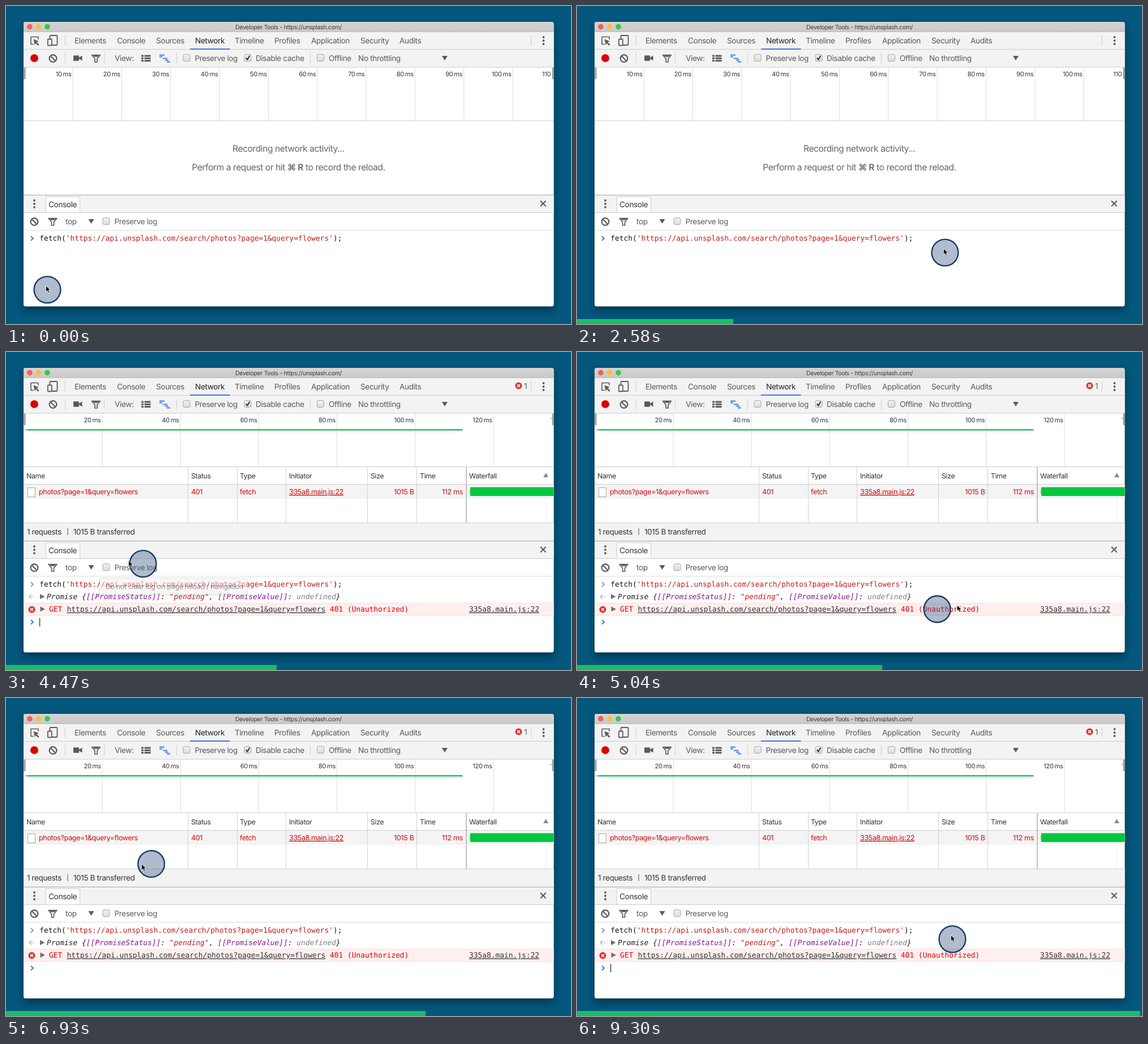
These frames come from a looping animation (998x561 px, 9330 ms). An HTML page:

```html
<!DOCTYPE html>
<html lang="en">
<head>
<meta charset="utf-8">
<title>Network panel demo</title>
<style>
html, body { margin: 0; width: 100%; height: 100%; overflow: hidden; background: #04577d; }
svg { display: block; width: 998px; height: 561px; }
text { font-family: Inter, Roboto, sans-serif; letter-spacing: -.03em; text-rendering: geometricPrecision; white-space: pre; }
.mono { font-family: "DejaVu Sans Mono", "Liberation Mono", monospace; font-size: 12.86px; letter-spacing: 0; }
</style>
</head>
<body>
<svg id="stage" viewBox="0 0 998 561" xmlns="http://www.w3.org/2000/svg"></svg>
<script>
const LOOP = 9330, STEP = 30, SENT = 3060;
const INK = '#5a5a5a', RED = '#d40b0b', LINE = '#cdcdcd', BAR = '#f3f3f3';
const URL_TEXT = 'https://api.unsplash.com/search/photos?page=1&amp;query=flowers';

// Drawing helpers
const rect = (x, y, w, h, fill, more = '') => `<rect x="${x}" y="${y}" width="${w}" height="${h}" fill="${fill}" ${more}/>`;
const dot = (x, y, r, fill, more = '') => `<circle cx="${x}" cy="${y}" r="${r}" fill="${fill}" ${more}/>`;
const path = (d, fill, more = '') => `<path d="${d}" fill="${fill}" ${more}/>`;
const stroke = (d, color, w = 1) => path(d, 'none', `stroke="${color}" stroke-width="${w}"`);
const text = (x, y, s, size = 13.7, fill = INK, more = '') => `<text x="${x}" y="${y}" font-size="${size}" fill="${fill}" ${more}>${s}</text>`;
const mono = (x, y, s, fill = '#111', more = '') => `<text class="mono" x="${x}" y="${y}" fill="${fill}" ${more}>${s}</text>`;
const span = (s, fill) => `<tspan fill="${fill}">${s}</tspan>`;
const group = (id, body) => `<g id="${id}">${body}</g>`;
const vline = (x, y1, y2, color = LINE) => stroke(`M${x} ${y1}V${y2}`, color);
const hline = (y, color = LINE) => stroke(`M31 ${y}H967.5`, color);

// Icons
const menu = (x, y) => [-6, 0, 6].map(d => dot(x, y + d, 1.9, INK)).join('');
const clear = (x, y) => dot(x, y, 6.4, 'none', `stroke="${INK}" stroke-width="2.2"`) + stroke(`M${x - 4.5} ${y - 4.5}l9 9`, INK, 2.2);
const filter = (x, y) => path(`M${x - 7.5} ${y - 6}h15l-5.5 6.5v6h-4v-6z`, 'none', `stroke="${INK}" stroke-width="1.7" stroke-linejoin="round"`) +
  path(`M${x - 6} ${y - 6}h12l-3 3.2h-6z`, INK);
const caretDown = (x, y) => path(`M${x - 5} ${y - 4}h10l-5 8z`, INK);
const checkbox = (x, y) => rect(x - 6, y - 6, 12, 12, 'url(#box)', 'rx="2.5" stroke="#a5a5a5"');
const chevron = (x, y, color, w = 1.9) => stroke(`M${x - 2} ${y - 3.8}l4 3.8l-4 3.8`, color, w);
const errorIcon = (x, y) => dot(x, y, 6, '#e03434') + stroke(`M${x - 2.4} ${y - 2.4}l4.8 4.8m0 -4.8l-4.8 4.8`, '#fff', 1.5);
const expander = (x, y) => path(`M${x - 4} ${y - 4.5}l8.5 4.5l-8.5 4.5z`, '#6e6e6e');

function ruler(first, step, unit, count) {
  let out = '';
  for (let i = 1; i <= count; i++) {
    const x = first + step * (i - 1);
    if (x < 967) out += vline(x.toFixed(1), 108, 202, '#dcdcdc');
    out += text((x - 2.5).toFixed(1), 124, unit * i + ' ms', 11.2, '#333', 'text-anchor="end" word-spacing="-1"');
  }
  return `<g clip-path="url(#rulerClip)">${out}</g>`;
}

function tooltip(id, x, y, w, label) {
  return group(id, rect(x, y, w, 29, '#f1f1f1', 'rx="2" stroke="#c6c6c6" filter="url(#tipShadow)"') + text(x + 10, y + 19.6, label, 12.6, '#333'));
}

function frameParts() {
  const lights = ['#fc5b57', '#fdbc40', '#34c84a'].map((c, i) => dot(42 + i * 15.5, 36.6, 4.8, c)).join('');
  const tabs = [['Elements', 121], ['Console', 196], ['Sources', 265], ['Network', 334], ['Timeline', 404],
    ['Profiles', 474], ['Application', 539], ['Security', 626], ['Audits', 695]]
    .map(([s, x]) => text(x, 65.6, s, 13.7, s === 'Network' ? '#222' : INK)).join('');
  const inspect = path('M57 59v-4.5h-13v13h5', 'none', `stroke="${INK}" stroke-width="1.6" stroke-linejoin="round"`) +
    path('M48.5 58.5l9.5 3.8l-3.8 1.5l4.3 4.3l-1.8 1.8l-4.3 -4.3l-1.3 3.8z', INK);
  const device = rect(77.5, 52, 13, 17, 'none', `rx="1.2" stroke="${INK}" stroke-width="1.8"`) +
    rect(73.8, 58.5, 7, 11, BAR, `rx="1" stroke="${INK}" stroke-width="1.8"`);
  const camera = rect(119, 87.3, 10, 9.5, INK, 'rx="1"') + path('M129 91l5.5 -3.5v9l-5.5 -3.5z', INK);
  const list = [86.5, 90.8, 95.1].map(y => rect(239, y, 4, 3, INK) + rect(244.5, y, 11, 3, INK)).join('');
  const falls = [[271, 9], [271, 5], [277, 8], [281, 6], [284, 6]]
    .map(([x, w], i) => rect(x, 85.6 + i * 3, w, 1.9, '#3b78e7')).join('');

  return rect(31, 28, 936.5, 502, '#fff', 'rx="4" filter="url(#shadow)"') +
    path('M31 45.5V32q0 -4 4 -4H963.5q4 0 4 4V45.5z', 'url(#title)') + lights +
    text(405, 41, 'Developer Tools - https://unsplash.com/', 10.55, '#3c3c3c') +
    rect(31, 45.5, 936.5, 63, BAR) + hline(45.5, '#bdbdbd') + hline(76.5) + hline(108) +
    inspect + device + vline(104.5, 52, 70) + tabs + rect(325, 75, 70.5, 2, '#3b78e7') +
    vline(927.5, 52, 70) + menu(949.5, 61) +
    dot(50, 92, 7.6, '#f3b4b4') + dot(50, 92, 6.8, '#d80000') + clear(83, 92.5) + vline(104.5, 83, 101) + camera +
    filter(159, 92.5) + vline(173.5, 83, 101) + text(192, 97.4, 'View:') + list + falls + vline(301.5, 83, 101) +
    checkbox(319, 91.5) + text(333.5, 97.4, 'Preserve log', 13.5) +
    checkbox(427, 91.5) + stroke('M423.8 91.5l2.6 3l4 -7', '#333', 2) + text(441, 97.4, 'Disable cache') +
    vline(537.5, 83, 101) + checkbox(555.5, 91.5) + text(570, 97.4, 'Offline') +
    text(622, 97.4, 'No throttling') + caretDown(775, 92) + hline(202.5);
}

function drawer() {
  return rect(31, 333, 936.5, 31.5, BAR) + hline(333.5, '#a9a9a9') + hline(364.5) + menu(50, 349) +
    rect(70.5, 336.5, 60, 28, '#fff', `stroke="${LINE}"`) + text(75, 354.6, 'Console', 13.7, '#333') +
    stroke('M944 343.8l9.6 9.6m0 -9.6l-9.6 9.6', '#555', 2) +
    clear(50, 380.5) + filter(82.5, 380.5) + text(105, 385.2, 'top') + caretDown(150.5, 380) +
    checkbox(177, 379.7) + text(191.5, 385.2, 'Preserve log', 13.5) + hline(395.5, '#dedede') +
    mono(59.3, 413.6, `fetch(${span(`'${URL_TEXT}'`, '#c41a16')});`);
}

function idle() {
  return ruler(118, 86.35, 10, 11) +
    text(400, 257, 'Recording network activity...', 15.7, '#666') +
    text(499, 290, 'Perform a request or hit <tspan font-weight="600">⌘ R</tspan> to record the reload.', 15.7, '#666', 'text-anchor="middle"') +
    chevron(46, 410, '#2f7de1');
}

function results() {
  const heads = [['Name', 36], ['Status', 327], ['Type', 413], ['Initiator', 500], ['Size', 644], ['Time', 731], ['Waterfall', 818]]
    .map(([s, x]) => text(x, 222.6, s, 12.4, '#333')).join('');
  const columns = [321.5, 408.5, 494.5, 638.5, 725.5].map(x => vline(x, 203, 301, '#d2d2d2')).join('');
  const cell = (x, s, more = '') => text(x, 251, s, 12.6, RED, more);
  const purple = s => span(s, '#881391');
  return ruler(170, 138.2, 20, 7) +
    rect(34, 136, 5, 2.5, '#b5b5b5') + rect(38.5, 136, 763, 2.5, '#10cc50') + rect(801, 136, 5.5, 2.5, '#2aa5d0') +
    `<rect id="row" x="31" y="234" width="936.5" height="25"/>` + hline(233.5) + columns +
    vline(953.5, 259, 301, '#ececec') + stroke('M813 203V301', '#b0b0b0', 1.5) + heads + path('M949 221h9l-4.5 -8z', '#8c8c8c') +
    rect(38.5, 239.5, 13, 16, '#fff', 'stroke="#a8a8a8"') +
    cell(58, 'photos?page=1&amp;query=flowers') + cell(327, '401') + cell(413, 'fetch') +
    cell(500, '335a8.main.js:22', 'text-decoration="underline"') +
    cell(720.5, '1015 B', 'text-anchor="end"') + cell(807, '112 ms', 'text-anchor="end"') +
    rect(818, 242, 2, 8, '#d0d0d0') + rect(820, 238.5, 147.5, 15.5, '#00c73e') +
    rect(31, 301, 936.5, 32, BAR) + hline(301.5) +
    text(37, 321.8, '1 requests', 13.6, '#333') + vline(109, 311, 323, '#555') + text(119, 321.8, '1015 B transferred', 13.6, '#333') +
    errorIcon(905.5, 59.5) + text(915, 65.2, '1') +
    chevron(46, 410, '#888', 1.6) +
    stroke('M45 428.2l-3.4 3.4l3.4 3.4', '#aaa', 1.5) + dot(48.3, 431.6, 1, '#aaa') + expander(64, 431.5) +
    mono(72, 436.4, `Promise {${purple('[[PromiseStatus]]')}: ${span('"pending"', '#c41a16')}, ${purple('[[PromiseValue]]')}: ${span('undefined', '#808080')}}`, '#222', 'font-style="italic"') +
    rect(31, 443, 936.5, 22, '#ffefef') + hline(443, '#ffd9d9') + hline(465, '#ffd9d9') +
    errorIcon(45.5, 454.3) + expander(64.5, 453.5) + mono(76, 458.3, 'GET', '#e00000') +
    mono(107.5, 458.3, URL_TEXT, '#333', 'text-decoration="underline"') + mono(572, 458.3, '401 (Unauthorized)', '#e00000') +
    mono(818, 458.3, '335a8.main.js:22', '#333', 'text-decoration="underline"') + chevron(46, 476.5, '#2f7de1');
}

const defs = `<defs>
  <linearGradient id="title" x2="0" y2="1"><stop stop-color="#d4d4d4"/><stop offset="1" stop-color="#c9c9c9"/></linearGradient>
  <linearGradient id="box" x2="0" y2="1"><stop stop-color="#f1f1f1"/><stop offset="1" stop-color="#dcdcdc"/></linearGradient>
  <filter id="shadow" x="-5%" y="-8%" width="110%" height="120%"><feDropShadow dx="0" dy="7" stdDeviation="7" flood-color="#001a2c" flood-opacity=".6"/></filter>
  <filter id="tipShadow" x="-5%" y="-20%" width="110%" height="150%"><feDropShadow dx="0" dy="1" stdDeviation="1.2" flood-opacity=".22"/></filter>
  <clipPath id="rulerClip"><rect x="31" y="108" width="933" height="95"/></clipPath>
</defs>`;

const stage = document.getElementById('stage');
stage.innerHTML = defs + rect(0, 0, 998, 561, '#04577d') + frameParts() + drawer() + group('idle', idle()) + group('results', results()) +
  rect(31.5, 108.5, 3, 20.5, '#989898') + rect(964.8, 108.5, 2.7, 20.5, '#989898') +
  '<rect id="caret" width="1.2" height="15" fill="#222"/>' +
  tooltip('logTip', 165.5, 398.5, 260, 'Do not clear log on page reload / navigation') +
  tooltip('statusTip', 341.5, 263.5, 119, '401 Unauthorized') +
  dot(0, 0, 23.4, 'rgba(58,88,130,.4)', 'id="halo" stroke="#173b66" stroke-width="2.4"') +
  path('M0 0V10.6L2.5 8.4L4.3 12.4L6.2 11.5L4.5 7.7H7.8z', '#000', 'id="arrow" stroke="#fff" stroke-width=".8"') +
  group('progress', rect(0, 553, 998, 8, '#18bd63', 'class="fill"') + rect(0, 552.5, 998, 1, '#3ccf85', 'class="fill"'));

const el = id => document.getElementById(id);
const [idleEl, resultsEl, row, caret, logTip, statusTip, halo, arrow] =
  ['idle', 'results', 'row', 'caret', 'logTip', 'statusTip', 'halo', 'arrow'].map(el);
const fills = [...document.querySelectorAll('.fill')];

// Pointer path: time, x, y
const POINTS = [
  [0, 73, 500.5], [250, 73, 500.5], [800, 83.5, 443], [1750, 83.5, 443], [1920, 169, 440], [2450, 650, 435],
  [3250, 650, 435], [3750, 179, 383], [4360, 179, 383], [4470, 242, 373.5], [4740, 920, 448], [4800, 899, 452],
  [5500, 120, 455], [6000, 99, 430.5], [6400, 99, 430.5], [6720, 160, 350], [7200, 355, 247], [8300, 355, 247],
  [8640, 500, 405], [9000, 663, 425.5], [LOOP, 663, 425.5]
];

const slope = (i, k) => POINTS[i] && POINTS[i + 1] ? (POINTS[i + 1][k] - POINTS[i][k]) / (POINTS[i + 1][0] - POINTS[i][0]) : 0;

function tangent(i, k) {
  const a = slope(i - 1, k), b = slope(i, k);
  return a * b > 0 ? 2 * a * b / (a + b) : 0;
}

// Monotone cubic through POINTS
function pointer(t) {
  t = Math.max(0, t);
  let i = 0;
  while (i < POINTS.length - 2 && t >= POINTS[i + 1][0]) i++;
  const p = POINTS[i], q = POINTS[i + 1], h = q[0] - p[0], u = (t - p[0]) / h, v = 1 - u;
  return [1, 2].map(k => p[k] * v * v * (1 + 2 * u) + q[k] * u * u * (3 - 2 * u) +
    h * u * v * (tangent(i, k) * v - tangent(i + 1, k) * u));
}

const show = (node, on) => node.setAttribute('visibility', on ? 'visible' : 'hidden');
const fade = (t, from, until, time) => t < from || t > until + time ? 0 : Math.min(1, 1 - (t - until) / time);
const place = (node, x, y) => node.setAttribute('transform', `translate(${x.toFixed(2)} ${y.toFixed(2)})`);

function draw(t) {
  const sent = t >= SENT;
  show(idleEl, !sent);
  show(resultsEl, sent);

  show(caret, (t + 950) % 1000 < 500);
  place(caret, sent ? 59 : 593.5, sent ? 469 : 402);

  const [hx, hy] = pointer(t), [cx, cy] = pointer(t - 26);
  place(halo, hx, hy);
  place(arrow, cx - 2.5, cy - 7);
  row.setAttribute('fill', cy - 7 > 234 && cy - 7 < 259 ? '#e8f0fa' : '#f4f4f4');

  logTip.setAttribute('opacity', fade(t, 3990, 4400, 140));
  statusTip.setAttribute('opacity', fade(t, 7650, 8310, 150));
  fills.forEach(f => f.setAttribute('width', (998 * t / LOOP).toFixed(1)));
}

const start = performance.now();
function tick() {
  const t = (performance.now() - start) % LOOP;
  draw(Math.floor(t / STEP) * STEP);
  requestAnimationFrame(tick);
}
tick();
</script>
</body>
</html>
```
